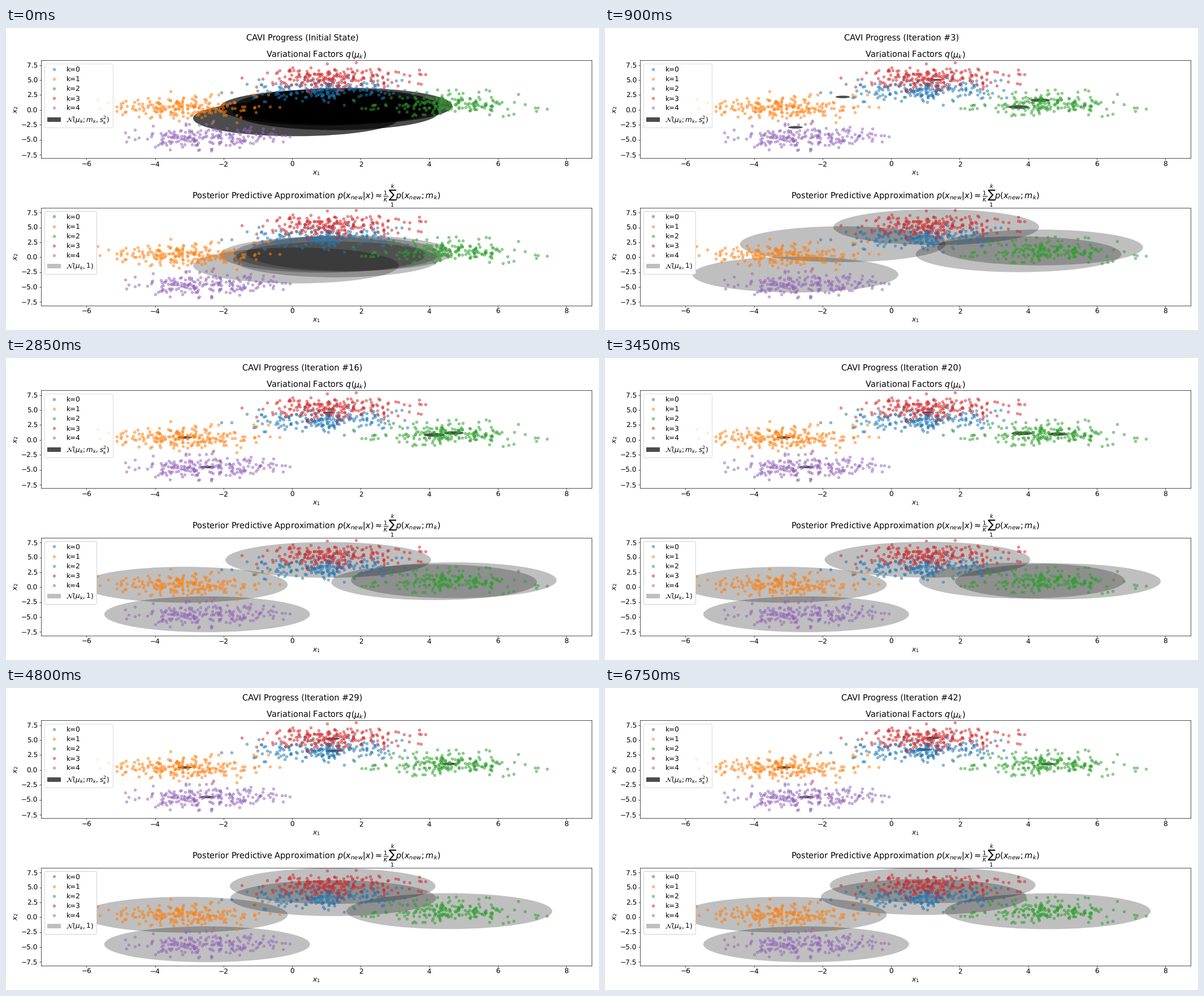
These frames come from a looping animation (1049x534 px, 6900 ms). A matplotlib script:

```python
import numpy as np
import matplotlib.pyplot as plt
from matplotlib.animation import FuncAnimation
from matplotlib.patches import Ellipse

W, H, DPI = 1049, 534, 64
PT = 0.972   # scale of the default point sizes
HOLD = 3     # extra frames showing the initial state
FRAMES, INTERVAL = 46, 150
SIZE = 200   # points per cluster

plt.rcParams.update({
    "font.family": "DejaVu Sans",
    "font.size": 14 * PT,
    "text.hinting": "no_hinting",
    "axes.linewidth": 0.8 * PT,
    "axes.titlepad": 6 * PT,
    "axes.labelpad": 3.2 * PT,
    "lines.markersize": 5.2 * PT,
    "lines.markeredgewidth": PT,
    "patch.linewidth": PT,
    "legend.labelspacing": 0.45,
})
for tick in ("xtick", "ytick"):
    plt.rcParams.update({
        f"{tick}.major.size": 3.5 * PT,
        f"{tick}.major.pad": 3.1 * PT,
        f"{tick}.major.width": 0.8 * PT,
    })

MEANS = np.array([(0.95, 3.39), (-3.13, 0.42), (4.57, 1.0),
                  (1.21, 5.37), (-2.48, -4.53)])
STD = (1.04, 0.93)


def step(t, centre, width):
    return 1 / (1 + np.exp(-(t - centre) / width))


class Factor:
    """A centre that moves through a few resting places by smooth steps."""

    def __init__(self, start, jump, *moves, members=SIZE):
        self.start = np.array(start)
        self.moves = [(jump, 0.8, 0.16), *moves]
        self.members = members  # points claimed before the clusters separate

    def centre(self, t):
        pos, last = self.start, self.start
        for target, when, width in self.moves:
            pos = pos + (np.array(target) - last) * step(t, when, width)
            last = np.array(target)
        return pos

    def radius(self, t):
        if t == 0:
            return 3
        members = self.members + (SIZE - self.members) * step(t, 26, 1.5)
        return 3 / np.sqrt(members)


FACTORS = [
    Factor((0.13, -1.38), (-2.85, -2.6), (MEANS[4], 4, 0.6)),
    Factor((0.91, 0.4), (-1.0, 2.6), (MEANS[1], 4, 0.7)),
    Factor((1.63, 0.72), (4.3, 1.7), ((5.05, 0.75), 15, 4.5),
           (MEANS[2], 26.8, 1), members=110),
    Factor((1.22, -0.4), (3.4, 0.3), ((4.2, 0.8), 3.5, 1.2),
           (MEANS[0], 24, 2), members=95),
    Factor((1.3, 0.55), (1.35, 5.1), ((1.05, 4.57), 5, 1),
           (MEANS[3], 26, 2), members=350),
]


def make_panel(top, bottom, title, alpha, label, framealpha):
    ax = fig.add_axes([61.7 / W, 1 - bottom / H, 974.3 / W, (bottom - top) / H])
    for k, cloud in enumerate(clouds):
        ax.plot(*cloud.T, "o", color=f"C{k}", alpha=0.5, label=f"k={k}")
    ellipses = [
        ax.add_patch(Ellipse((0, 0), 6, 6, facecolor="black", lw=0, alpha=alpha,
                             zorder=1, label="_" if i else label))
        for i in range(len(FACTORS))
    ]
    ax.set(xlim=(-7.33, 8.737), ylim=(-8.07, 8.3),
           xticks=np.arange(-6, 9, 2), yticks=np.arange(-7.5, 8, 2.5),
           xlabel="$x_1$", ylabel="$x_2$")
    ax.set_title(title)
    ax.legend(loc="upper left", framealpha=framealpha)
    return ellipses


def make_cloud(mean):
    z = rng.normal(size=(SIZE, 2))
    z = (z - z.mean(axis=0)) / z.std(axis=0)
    return mean + STD * z.clip(-2.9, 2.9)


rng = np.random.default_rng(7)
clouds = [make_cloud(mean) for mean in MEANS]

fig = plt.figure(figsize=(W / DPI, H / DPI), dpi=DPI, facecolor="white")
heading = fig.suptitle("")
posteriors = make_panel(57.2, 230.2, r"Variational Factors $q(\mu_k)$", 0.7,
                        r"$\mathcal{N}(\mu_k; m_k, s_k^2)$", 0.8)
predictives = make_panel(
    317.7, 490.5,
    r"Posterior Predictive Approximation "
    r"$p(x_{new}|x) \approx \frac{1}{K}\sum_{1}^{k}p(x_{new}; m_k)$",
    0.25, r"$\mathcal{N}(\mu_k, 1)$", 1)


def update(frame):
    t = max(0, frame - HOLD)
    state = f"Iteration #{t}" if t else "Initial State"
    heading.set_text(f"CAVI Progress ({state})")
    for factor, posterior, predictive in zip(FACTORS, posteriors, predictives):
        centre, diameter = factor.centre(t), 2 * factor.radius(t)
        posterior.set(center=centre, width=diameter, height=diameter)
        predictive.set(center=centre)
    return [heading, *posteriors, *predictives]


anim = FuncAnimation(fig, update, frames=FRAMES, interval=INTERVAL,
                     init_func=lambda: update(0), repeat=True, repeat_delay=0)
plt.show()
```
